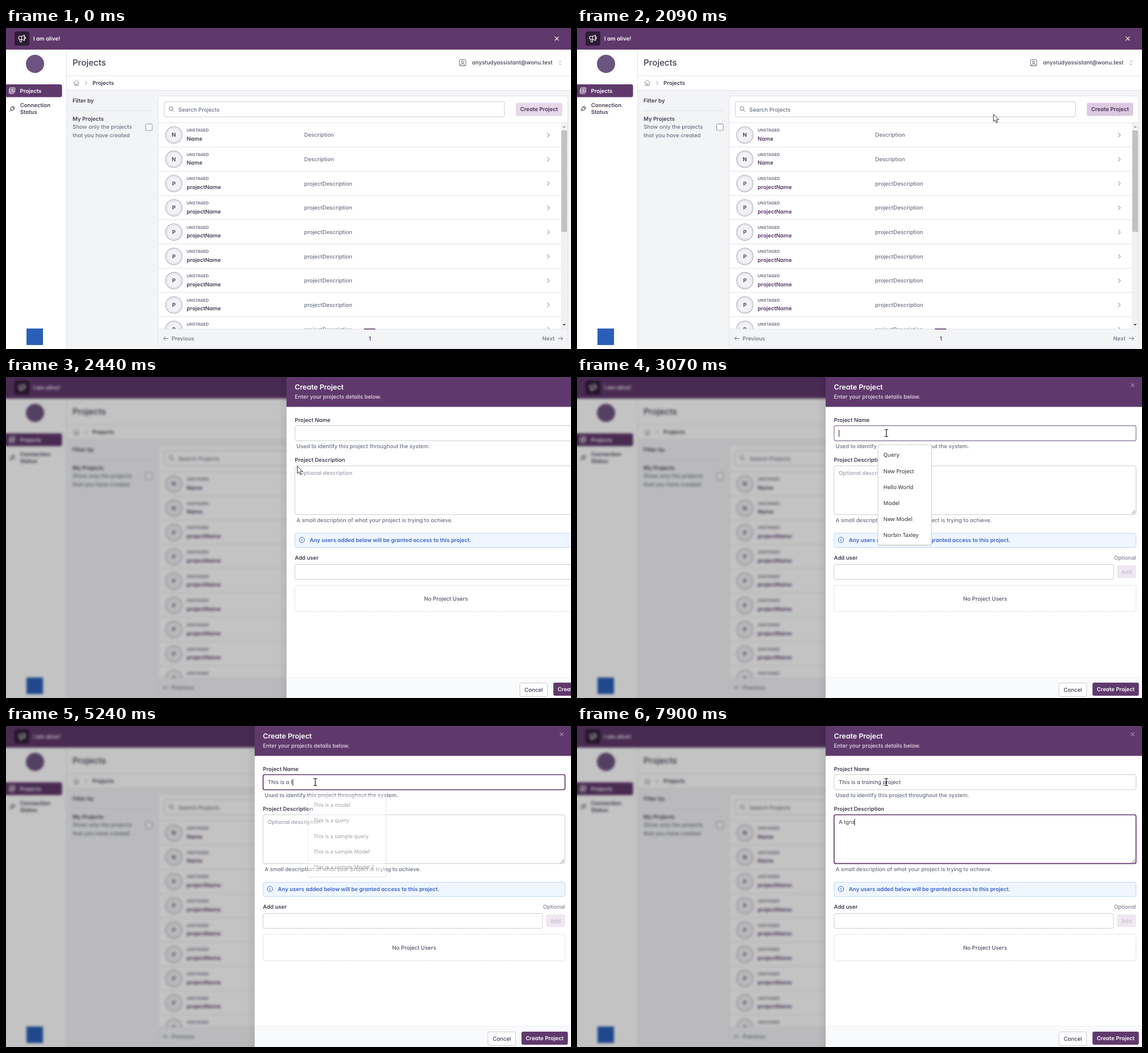
These frames come from a looping animation (993x564 px, 8 s). An HTML page:

```html
<!DOCTYPE html>
<html lang="en">
<head>
<meta charset="utf-8">
<title>Create project</title>
<style>
html, body { margin: 0; width: 100%; height: 100%; overflow: hidden; background: #fff; }
#stage { position: relative; width: 993px; height: 564px; overflow: hidden; }
#stage > * { position: absolute; left: 0; top: 0; width: 993px; height: 564px; }
svg { overflow: visible; }
text { font-family: Inter, "Open Sans", sans-serif; font-feature-settings: "cv11"; white-space: pre; text-rendering: geometricPrecision; }
.menu text { font-family: "Noto Sans", "Open Sans", sans-serif; font-feature-settings: normal; }
</style>
</head>
<body>
<div id="stage">
  <svg id="page"></svg>
  <div id="veil"></div>
  <svg id="panel"></svg>
  <svg id="pointer"></svg>
</div>
<script>
const LOOP = 8000, SIZE = 9.57;
const PURPLE = '#60396c', INK = '#463d50', GREY = '#6b7280', LINE = '#e1e3e8', FIELD = '#c9ccd3';
const $ = id => document.getElementById(id);

function el(parent, tag, attrs = {}) {
  const node = document.createElementNS('http://www.w3.org/2000/svg', tag);
  for (const k in attrs) node.setAttribute(k, attrs[k]);
  return parent.appendChild(node);
}
function rect(p, x, y, x2, y2, fill, more = {}) {
  return el(p, 'rect', { x, y, width: x2 - x, height: y2 - y, fill, ...more });
}
function line(p, d, stroke, width = 1, more = {}) {
  return el(p, 'path', { d, stroke, 'stroke-width': width, fill: 'none',
    'stroke-linecap': 'round', 'stroke-linejoin': 'round', ...more });
}
function label(p, x, y, str, weight = 500, fill = GREY, size = SIZE, anchor = 'start') {
  const t = el(p, 'text', { x, y, fill, 'font-size': size, 'font-weight': weight, 'text-anchor': anchor });
  t.textContent = str;
  return t;
}

// ---- project list page ----
const page = $('page');
rect(page, 0, 0, 993, 564, '#f3f4f6');
rect(page, 107, 38, 993, 109, '#fff');
rect(page, 0, 38, 107, 564, '#fff');
line(page, 'M106.5 38V564M107 84H993M107 109.5H993', LINE);

rect(page, 0, 0, 993, 38, PURPLE);
rect(page, 15, 6, 41, 31, '#2f1b37', { rx: 4 });
line(page, 'M11 6v13.2a1.8 1.8 0 0 1-3.4.6L5.4 13.7M18 13a3 3 0 0 0 0-6M7 14a4 4 0 0 1 0-8h1.8Q15 6 18 3v14q-3-3-9.2-3z',
  '#fff', 1.6, { transform: 'translate(19.8 10.4) scale(.69)' });
label(page, 48, 22, 'I am alive!', 600, '#fff', 9.6);
line(page, 'M965 15.6l6 6m0-6l-6 6', '#fff', 1.2);

el(page, 'circle', { cx: 51, cy: 63, r: 16, fill: '#6d5480' });
rect(page, 36, 528, 65, 557, '#2a5fb8');

rect(page, -5, 99, 98.5, 121.5, PURPLE, { rx: 3.5 });
line(page, 'M7.5 105h8v7.6h-8zM5.8 107v8h8M9.5 107.3h4M9.5 109h4M9.5 110.6h4', '#fff', 1);
label(page, 24.5, 113.7, 'Projects', 600, '#fff');
line(page, 'M-2.8-2h5.6v2.2a2.8 2.8 0 0 1-5.6 0zM-1.4-2v-2.8M1.4-2v-2.8M0 3v3', INK, 1,
  { transform: 'translate(11.2 141.6) rotate(45)' });
label(page, 24.7, 139.4, 'Connection', 600, INK);
label(page, 24.7, 151, 'Status', 600, INK);

label(page, 117, 66, 'Projects', 500, INK, 15);
rect(page, 797, 55.5, 808, 66.5, 'none', { rx: 1.5, stroke: '#6b6475' });
el(page, 'circle', { cx: 802.5, cy: 59.9, r: 2.2, fill: 'none', stroke: '#6b6475' });
line(page, 'M798.5 66c.6-4 7.4-4 8 0', '#6b6475');
label(page, 819, 64.3, 'anystudyassistant@wonu.test', 500, INK, 9.75);
line(page, 'M972 59.5l2-2 2 2M972 62.8l2 2 2-2', '#8b8f99', .9);
line(page, 'M118.8 96.4l4.8-4.8 4.8 4.8M120 95.4v5.6h7.2v-5.6M122.4 101v-3.2h2.4v3.2', '#8b8796', .9);
line(page, 'M139.4 93.7l2.9 2.9-2.9 2.9', '#8b8f99');
label(page, 152, 99.8, 'Projects', 600, INK);

label(page, 117, 131, 'Filter by', 600, INK);
line(page, 'M117 145.5H257', LINE);
label(page, 117, 163, 'My Projects', 600, INK);
label(page, 117, 177.3, 'Show only the projects');
label(page, 117, 192, 'that you have created');
rect(page, 245.5, 168.5, 257, 180, '#fff', { rx: 2, stroke: '#8b8e98' });

rect(page, 267.5, 119.5, 987.5, 562.5, '#fff', { rx: 5, stroke: LINE });
rect(page, 278, 129.5, 876, 156, '#fff', { rx: 3, stroke: FIELD });
el(page, 'circle', { cx: 290, cy: 141.5, r: 3.2, fill: 'none', stroke: GREY });
line(page, 'M292.4 144l2.8 2.8', GREY);
label(page, 303, 146.5, 'Search Projects');
const createBtn = rect(page, 896, 131.5, 977.5, 154.5, '#e4d8e9', { rx: 3 });
label(page, 936.8, 146, 'Create Project', 600, '#4d3059', SIZE, 'middle');

const clip = el(el(page, 'defs'), 'clipPath', { id: 'listClip' });
rect(clip, 268, 166, 987, 529, '#000');
const list = el(page, 'g', { 'clip-path': 'url(#listClip)' });
line(list, 'M268 166.5H987', LINE);
const names = [];
for (let i = 0; i < 9; i++) {
  const y = 188 + i * 42.65, plain = i < 2;
  line(list, `M268 ${y + 20.9}H975`, LINE);
  el(list, 'circle', { cx: 295, cy: y, r: 14.4, fill: '#fff', stroke: '#b3b0bb', 'stroke-width': 1.3 });
  el(list, 'circle', { cx: 295, cy: y, r: 12.2, fill: '#f2f3f6', stroke: '#d0cfd7', 'stroke-width': .8 });
  label(list, 295, y + 3.4, plain ? 'N' : 'P', 600, INK, SIZE, 'middle');
  label(list, 317.6, y - 6, 'UNSTAGED', 600, '#6d6279', 7.1);
  names.push(label(list, 317.6, y + 9.6, plain ? 'Name' : 'projectName', 600, INK));
  label(list, 524, y + 3.3, plain ? 'Description' : 'projectDescription');
  line(list, `M951.4 ${y - 3.6}l3.6 3.6-3.6 3.6`, GREY);
}
rect(page, 975, 167, 987, 528, '#f1f1f1');
rect(page, 976, 180, 986, 358, '#c1c1c1');
el(page, 'path', { d: 'M978 175h6l-3-3z', fill: '#a3a3a3' });
el(page, 'path', { d: 'M978 520h6l-3 3z', fill: '#505050' });

rect(page, 268, 529, 987, 562, '#f3f4f6', { rx: 4 });
line(page, 'M268 529H987', LINE);
rect(page, 629, 528, 649, 529.6, PURPLE);
line(page, 'M285 545.5h-8m3-3l-3 3 3 3M970.5 545.5h8m-3-3l3 3-3 3', GREY);
label(page, 291, 548.7, 'Previous');
label(page, 639.5, 548.7, '1', 600, PURPLE, SIZE, 'middle');
label(page, 964, 548.7, 'Next', 500, GREY, SIZE, 'end');

// ---- slide-over panel ----
const panel = $('panel');
const shade = el(el(panel, 'defs'), 'linearGradient', { id: 'shade' });
el(shade, 'stop', { offset: 0, 'stop-color': '#000', 'stop-opacity': 0 });
el(shade, 'stop', { offset: 1, 'stop-color': '#000', 'stop-opacity': .06 });
rect(panel, 423, 0, 437, 564, 'url(#shade)');
rect(panel, 437, 0, 993, 564, '#fff');
rect(panel, 437, 0, 993, 52.5, PURPLE);
label(panel, 451.6, 22, 'Create Project', 600, '#fff', 12.4);
label(panel, 451.6, 38.4, 'Enter your projects details below.', 500, '#e6dbea');
line(panel, 'M973.6 11.6l5.8 5.8m0-5.8l-5.8 5.8', '#cdbcd3');

function field(y, y2, x2 = 982.5) {
  return rect(panel, 451.8, y, x2, y2, '#fff', { rx: 3, stroke: FIELD });
}
label(panel, 451.6, 79.3, 'Project Name', 600, INK);
const nameBox = field(85.5, 112);
label(panel, 454.4, 124.6, 'Used to identify this project throughout the system.');
label(panel, 451.6, 149, 'Project Description', 600, INK);
const descBox = field(156, 241.7);
const hint = label(panel, 460, 172.3, 'Optional description', 500, '#9ca0ab');
line(panel, 'M975 240.3l6-6M978.4 240.3l2.6-2.6', '#6a6a6a', .9);
label(panel, 454.4, 255.4, 'A small description of what your project is trying to achieve.');

rect(panel, 451.8, 274.5, 982.5, 299.5, '#eff6ff', { rx: 3, stroke: '#bfd7fb' });
el(panel, 'circle', { cx: 464, cy: 286.2, r: 4.7, fill: 'none', stroke: '#3f68cf' });
line(panel, 'M463.4 285.8h.7v2.6M464 283.8v.1', '#3f68cf');
label(panel, 477.8, 290, 'Any users added below will be granted access to this project.', 600, '#3c63cb');

label(panel, 451.6, 320.5, 'Add user', 600, INK);
label(panel, 982.5, 320.5, 'Optional', 500, '#7d8391', SIZE, 'end');
field(329.5, 355.5, 943);
rect(panel, 949.3, 331, 982.5, 353.3, '#efe7f1', { rx: 3 });
label(panel, 965.9, 345.6, 'Add', 500, '#cabdcf', SIZE, 'middle');
rect(panel, 451.8, 366, 982.5, 412.5, 'none', { rx: 3, stroke: '#cfd1d8', 'stroke-dasharray': '2.2 1.6' });
label(panel, 717.3, 392.6, 'No Project Users', 500, '#4f5563', SIZE, 'middle');

rect(panel, 437, 527.5, 993, 564, '#f9fafb');
line(panel, 'M437 527.5H993', '#eceef1');
rect(panel, 847, 537.5, 895.7, 561.5, '#fff', { rx: 3, stroke: FIELD });
label(panel, 871.4, 553, 'Cancel', 500, INK, SIZE, 'middle');
rect(panel, 906, 537, 987.5, 560, PURPLE, { rx: 3 });
label(panel, 946.7, 552.2, 'Create Project', 600, '#fff', SIZE, 'middle');

const nameText = label(panel, 460, 102.2, '', 400, INK);
const descText = label(panel, 460, 172.3, '', 400, INK);
const caret = rect(panel, 460, 93, 461, 105, '#222');

function menu(x2, y2, items) {
  const g = el(panel, 'g', { class: 'menu' });
  rect(g, 528.5, 120.5, x2 + 1, y2 + 2, '#000', { rx: 3, opacity: .08 });
  rect(g, 529, 119, x2, y2, '#fff', { rx: 2, stroke: '#cdcdd0', 'stroke-width': .9 });
  items.forEach((s, i) => label(g, 538.6, 140.4 + i * 28.2, s, 400, '#2a2a2a', 9.6));
  const cx = (529 + x2) / 2, cy = (119 + y2) / 2;
  return (alpha, scale = 1) => {
    g.setAttribute('opacity', alpha);
    g.setAttribute('transform', `translate(${cx} ${cy}) scale(${scale}) translate(${-cx} ${-cy})`);
  };
}
const recent = menu(623, 295, ['Query', 'New Project', 'Hello World', 'Model', 'New Model', 'Norbin Taxley']);
const matches = menu(670, 267, ['This is a model', 'This is a query', 'This is a sample query',
  'This is a sample Model', 'This is a sample Model 2']);

// ---- pointer shapes ----
const pointer = $('pointer');
const shapes = {
  arrow: line(pointer, 'M0 0V12.4L2.9 9.8 5 14.4 7.1 13.5 5.1 9H9z', '#111', .9, { fill: '#fff' }),
  hand: line(pointer, 'M-1 .8c0-1.4 2-1.4 2 0V5.5c0-1.2 2-1.1 2 0v.5c.2-1 1.9-.9 2 .2v.5c.4-.8 1.9-.5 1.9.6V11L5.6 14.6H.2L-4 9.2c-.8-1.2.8-2.2 1.8-1.2L-1 9.2z', '#111', .9, { fill: '#fff' }),
  beam: line(pointer, 'M-2.8-6h2q.8 0 .8.8V5.2q0 .8-.8.8h-2M2.8-6h-2Q0-6 0-5.2V5.2Q0 6 .8 6h2', '#111', 1.1)
};

// ---- timeline ----
const track = [[270, 690, 566], [480, 760, 450], [700, 872, 262], [900, 945, 160], [1020, 961, 142],
  [1820, 961, 142], [1950, 900, 146], [2090, 732, 152], [2230, 525, 156], [2440, 512, 157],
  [2600, 512, 157], [2720, 526, 132], [2860, 544, 98.5], [3210, 543.5, 98.5]];
const nameKeys = [4020, 4220, 4420, 4490, 4560, 4650, 4760, 4830, 4900, 4960, 5160, 5300, 5370, 5440,
  5640, 5710, 5800, 5910, 6010, 6110, 6220, 6340, 6410, 6480, 6540, 6740];
const descKeys = [7280, 7420, 7570, 7570, 7770, 7900];

const ramp = (t, a, b) => Math.max(0, Math.min(1, (t - a) / (b - a)));
const typed = (str, keys, t) => str.slice(0, keys.filter(k => k <= t).length);
const mix = (a, b, k) => 'rgb(' + a.map((v, i) => Math.round(v + (b[i] - v) * k)) + ')';

// y of the curve cubic-bezier(0, 0, .2, 1)
function slideEase(x) {
  let lo = 0, hi = 1;
  for (let i = 0; i < 24; i++) {
    const s = (lo + hi) / 2;
    if (.6 * s * s * (1 - s) + s * s * s < x) lo = s; else hi = s;
  }
  return lo * lo * (3 - 2 * lo);
}
function place(t) {
  for (let i = 1; i < track.length; i++) {
    const [a, x, y] = track[i - 1], [b, x2, y2] = track[i];
    if (t < b) { const k = ramp(t, a, b); return [x + (x2 - x) * k, y + (y2 - y) * k]; }
  }
  return track[track.length - 1].slice(1);
}
function focus(box, k) {
  box.setAttribute('stroke', mix([201, 204, 211], [96, 57, 108], k));
  box.setAttribute('stroke-width', 1 + .7 * k);
}

function draw(t) {
  const q = Math.floor((t - 60) / 70) * 70 + 60;

  names.forEach(n => n.setAttribute('fill', q < 270 ? INK : '#533662'));
  createBtn.setAttribute('fill', mix([228, 216, 233], [220, 200, 225], ramp(t, 1000, 1090)));

  const open = slideEase(ramp(q, 2160, 2630));
  panel.style.transform = `translateX(${Math.round(556 * (1 - open))}px)`;
  panel.style.visibility = open > 0 ? 'visible' : 'hidden';
  const dim = Math.sqrt(ramp(q, 2160, 2300)), blur = 2.2 * Math.sqrt(ramp(q, 2160, 2440));
  $('veil').style.background = `rgba(0,0,0,${.235 * dim})`;
  $('veil').style.backdropFilter = blur ? `blur(${blur}px)` : 'none';

  const inDesc = t >= 7000;
  focus(nameBox, ramp(q, 2960, 3180) * (1 - ramp(t, 6960, 7150)));
  focus(descBox, ramp(t, 6960, 7150));

  nameText.textContent = typed('This is a training project', nameKeys, t);
  descText.textContent = typed('A tgra', descKeys, t);
  hint.style.display = descText.textContent ? 'none' : '';
  const active = inDesc ? descText : nameText;
  const end = active.textContent ? active.getComputedTextLength() : 0;
  caret.setAttribute('x', 460 + end);
  caret.setAttribute('y', inDesc ? 163 : 93);
  caret.style.display = t >= 2930 && !(t >= 3550 && t < 4020) ? '' : 'none';

  const gone = ramp(t, 4020, 4160), left = ramp(t, 5160, 5305);
  recent(ramp(q, 2930, 3070) * (1 - gone), 1 - .05 * gone);
  matches(ramp(t, 4100, 4220) * (1 - left), 1 - .055 * left);

  const [x, y] = place(q);
  const kind = t < 270 ? '' : q >= 2790 ? 'beam' : x > 896 && y < 154 && q < 2090 ? 'hand' : 'arrow';
  for (const k in shapes) {
    shapes[k].style.display = k === kind ? '' : 'none';
    shapes[k].setAttribute('transform', `translate(${x} ${y})`);
  }
}

const start = performance.now();
function tick() {
  draw((performance.now() - start) % LOOP);
  requestAnimationFrame(tick);
}
tick();
</script>
</body>
</html>
```
